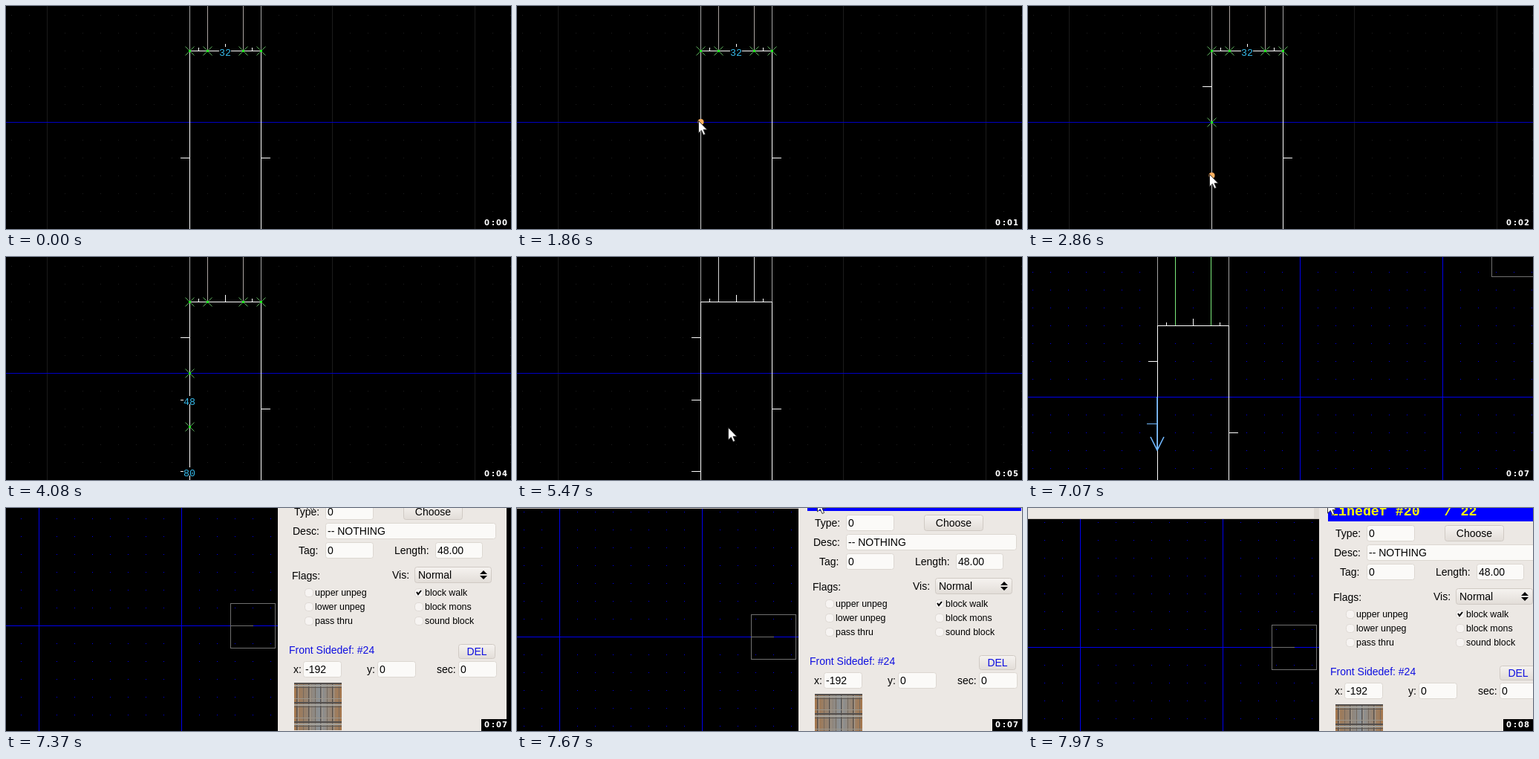
An HTML page that plays this animation: 680 by 300 pixels, repeating every 8 s.

```html
<!DOCTYPE html>
<html lang="en">
<head>
<meta charset="utf-8">
<title>Map editor</title>
<style>
  html, body { margin: 0; width: 100%; height: 100%; overflow: hidden; background: #000; }
  svg { display: block; width: 680px; height: 300px; }
  .crisp { shape-rendering: crispEdges; }
  .label { font: 13.33px "Liberation Mono", monospace; fill: #35b8e8; text-anchor: middle; }
  .ui { font: 14px "Liberation Sans", sans-serif; fill: #000; white-space: pre; }
  .small { font-size: 12.4px; }
  .title { font: bold 18.3px "Liberation Mono", monospace; fill: #ff0; }
  .clock { font: bold 10px "DejaVu Sans", sans-serif; fill: #fff; }
</style>
</head>
<body>
<svg id="stage" viewBox="0 0 680 300"></svg>
<script>
const LOOP = 8000;
const TICKS = [0, 710, 860, 1010, 1160, 1310, 1460, 1560, 1710, 1860, 2010, 2160, 2310,
  2460, 2560, 2710, 2860, 3010, 3160, 3620, 3770, 4080, 4830, 4980, 5170, 5320, 5470,
  5620, 5770, 5920, 6070, 6220, 6370, 6470, 6620, 6770, 6920, 7070, 7220, 7370, 7520,
  7670, 7820, 7970];

// [time, x, y]
const CAMERA = [[6920, 0, 0], [7070, -73, 32], [7370, -395, 194], [7970, -369, 223]];
const POINTER = [[710, 331, 66], [1710, 244, 154], [2160, 244, 154], [2860, 244, 226],
  [3160, 244, 226], [3620, 262, 232], [4830, 270, 236], [5470, 284, 229], [5770, 246, 206],
  [6370, 246, 206], [6920, 560, 30], [7070, 690, -80], [7370, 800, -210], [7970, 772, -233]];

const snap = t => TICKS.filter(k => k <= t).pop();
const during = (t, from, to) => t >= from && t < to;

function along(keys, t) {
  if (t <= keys[0][0]) return keys[0].slice(1);
  for (let i = 1; i < keys.length; i++) {
    const [t0, x0, y0] = keys[i - 1], [t1, x1, y1] = keys[i];
    if (t <= t1) {
      const p = (t - t0) / (t1 - t0);
      return [Math.round(x0 + (x1 - x0) * p), Math.round(y0 + (y1 - y0) * p)];
    }
  }
  return keys[keys.length - 1].slice(1);
}

const rect = (x, y, w, h, fill, extra = "") =>
  `<rect x="${x}" y="${y}" width="${w}" height="${h}" fill="${fill}" ${extra}/>`;
const text = (x, y, s, cls = "ui", extra = "") => `<text x="${x}" y="${y}" class="${cls}" ${extra}>${s}</text>`;
const stroke = (d, color, w = 1) => `<path d="${d}" fill="none" stroke="${color}" stroke-width="${w}"/>`;
const vLine = (x, y0, y1, color) => rect(x, y0, 1, y1 - y0, color, 'class="crisp"');
const hLine = (y, x0, x1, color) => rect(x0, y, x1 - x0, 1, color, 'class="crisp"');

function grid(t) {
  const bright = t >= 7070;
  const blue = bright ? "#0000ee" : "#0000c4";
  let out = `<defs><pattern id="dots" x="7" y="12" width="24" height="24" patternUnits="userSpaceOnUse">
    ${rect(0, 0, 1, 1, bright ? "#0000ee" : "#1e1e1e")}</pattern></defs>`;
  out += rect(-300, -300, 1200, 900, "url(#dots)");
  for (let k = -2; k < 5; k++) out += vLine(55 + 192 * k, -300, 600, bright ? blue : "#1b1b1b");
  for (let k = -2; k < 3; k++) out += hLine(156 + 192 * k, -300, 1100, blue);
  return out;
}

function vertex(x, y, r = 6, color = "#5cae5c") {
  const cx = x + .5, cy = y + .5;
  return stroke(`M${cx - r} ${cy - r}l${2 * r} ${2 * r}m0 ${-2 * r}l${-2 * r} ${2 * r}`, color) +
    rect(x - 1, y - 1, 3, 3, r > 6 ? "#ffb050" : "#20f020");
}

function lengthLabel(x, y, value) {
  return rect(x - 8, y - 7, 16, 11, "#000") + text(x, y + 5, value, "label");
}

function walls(t, pointer) {
  const vertexMode = t < 4830;
  const inner = vertexMode ? "#aaa4a0" : t < 6070 ? "#d8d8d8" : "#7cec7c";
  const corners = [60, ...(t >= 2010 ? [156] : []), ...(t >= 3010 ? [228] : []), 348];
  const splitting = during(t, 1460, 3010);
  let out = vLine(247, -300, 60, "#a4a4a4") + vLine(343, -300, 60, "#a4a4a4");
  for (const x of [271, 319]) out += vLine(x, -300, 60, inner);
  out += vLine(247, 60, 600, "#fff") + vLine(343, 60, 600, "#fff") + hLine(60, 247, 344, "#fff");
  out += vLine(259, 56, 60, "#fff") + vLine(295, 51, 60, "#fff") + vLine(331, 56, 60, "#fff");
  out += hLine(204, 344, 356, "#fff");

  for (let i = 1; i < corners.length; i++) {
    const last = i === corners.length - 1;
    if (splitting && last) out += vLine(247, corners[i - 1], 348, "#d2d2d2");
    else out += hLine((corners[i - 1] + corners[i]) / 2, 235, 247, "#fff");
  }

  if (vertexMode) {
    if (t < 3010) out += lengthLabel(295, 62, "32");
    else out += lengthLabel(247, 194, "48") + lengthLabel(247, 290, "80");
    for (const x of [247, 271, 319, 343]) out += vertex(x, 60);
    for (const y of corners.slice(1, -1)) {
      const hot = y === 228 && t < 3620;
      out += hot ? vertex(247, y, 9, "#ffb050") : vertex(247, y);
    }
    if (splitting) out += `<circle cx="247.5" cy="${pointer[1] + 2}" r="4" fill="#ffb060"/>`;
  } else if (t >= 5620) {
    out += stroke("M247 156V228M238 210L247 228L256 210", "#70b8ff", 1.6) +
      hLine(192, 233, 247, "#70b8ff");
  }
  return out;
}

const field = (x, y, w, value) =>
  rect(x + .5, y + .5, w - 1, 21, "#fbfaf8", 'rx="3" stroke="#dcd7d1"') + text(x + 3, y + 16, value);

const button = (x, y, w, h, label, color = "#000") =>
  rect(x + .5, y + .5, w - 1, h - 1, "url(#face)", 'rx="3" stroke="#d0cac4"') +
  text(x + w / 2, y + h / 2 + 5, label, "ui", `text-anchor="middle" style="fill:${color}"`);

function check(x, y, label, on) {
  return rect(x - 5.5, y - 5.5, 11, 11, "#f7f4f2", 'rx="4" stroke="#ded9d4"') +
    (on ? stroke(`M${x - 3} ${y - 1}l2 3l4 -5`, "#000", 2) : "") +
    text(x + 8, y + 4, label, "ui small");
}

function texture(x, y) {
  let out = rect(x, y, 64, 64, "url(#planks)");
  for (let i = 0; i < 4; i++) {
    const left = x + 16 * i + 3;
    out += rect(left, y, 1.5, 64, "#5a5450") + rect(left + 2, y, 1, 64, "#a89c8e") + rect(left + 9, y, 1, 64, "#75695e");
  }
  for (let top = y; top < y + 60; top += 26) {
    out += rect(x, top, 64, 2, "#54504e") + rect(x, top + 3, 64, 2, "#a2a09a") +
      rect(x, top + 6, 64, 1, "#5c5854") + rect(x, top + 21, 64, 1, "#9a948a");
  }
  return out;
}

function panel() {
  const blue = "#1010e0";
  let out = `<defs>
    <linearGradient id="face" x2="0" y2="1"><stop stop-color="#f6f3f0"/><stop offset="1" stop-color="#e2ddd8"/></linearGradient>
    <linearGradient id="planks"><stop stop-color="#a4764c"/><stop offset=".3" stop-color="#928272"/>
      <stop offset=".55" stop-color="#8a9298"/><stop offset="1" stop-color="#a4764c"/></linearGradient></defs>`;
  out += rect(-700, -40, 1092, 55, "#ece8e4") + rect(-700, 14, 1092, 1, "#c4bcb6") + rect(385, -40, 7, 54, "#e0dbd6");
  out += rect(328.5, 157.5, 60, 60, "none", 'stroke="#707070"') + hLine(187, 328, 359, "#707070");
  out += rect(392, -40, 308, 600, "#ece8e4") + rect(700, -40, 300, 600, "#000");
  out += rect(404, -14, 288, 32, "#00f") + text(407, 10, "Linedef #20   / 22", "title", 'xml:space="preserve"');
  out += text(414, 39, "Type:") + field(456, 23, 65, "0") + button(561, 23, 80, 22, "Choose");
  out += text(412, 65, "Desc:") + field(456, 49, 230, "-- NOTHING");
  out += text(420, 91, "Tag:") + field(456, 75, 65, "0");
  out += text(549, 91, "Length:") + field(604, 75, 64, "48.00");
  out += text(411, 125, "Flags:") + text(546, 124, "Vis:");
  out += button(576, 108, 104, 22, "") + text(581, 124, "Normal");
  out += `<path d="M664 118l5 -5l5 5zM664 120l5 5l5 -5z"/>`;
  ["upper unpeg", "lower unpeg", "pass thru"].forEach((s, i) => out += check(434, 143 + 19 * i, s));
  ["block walk", "block mons", "sound block"].forEach((s, i) => out += check(582, 143 + 19 * i, s, i === 0));
  out += text(407, 225, "Front Sidedef: #24", "ui", `style="fill:${blue}"`) + button(635, 212, 50, 20, "DEL", blue);
  out += text(413, 251, "x:") + field(426, 235, 52, "-192");
  out += text(512, 251, "y:") + field(526, 235, 52, "0");
  out += text(606, 251, "sec:") + field(635, 235, 52, "0");
  return out + texture(414, 264);
}

function arrow([x, y]) {
  return `<path transform="translate(${x} ${y})" d="M.5 .5V17L4.3 13.4L7 19.5L9.6 18.4L7 12.4H12Z"
    fill="#fff" stroke="#222" stroke-width=".9"/>`;
}

function clock(t) {
  const seconds = Math.floor((t + 30) / 1000);
  return rect(640, 284, 40, 16, "#000") + text("644 654 660 668", 295, "0:0" + seconds, "clock");
}

function scene(t) {
  const [cx, cy] = along(CAMERA, t), pointer = along(POINTER, t);
  const pointerShown = during(t, 710, 3770) || t >= 4830;
  return rect(0, 0, 680, 300, "#000") +
    `<g transform="translate(${cx} ${cy})">${grid(t)}${walls(t, pointer)}
      <g transform="translate(369 -223)">${panel()}</g>
      ${pointerShown ? arrow(pointer) : ""}</g>` + clock(t);
}

const stage = document.getElementById("stage");
const start = performance.now();
let shown = -1;

function draw() {
  const t = snap((performance.now() - start) % LOOP);
  if (t !== shown) stage.innerHTML = scene(shown = t);
  requestAnimationFrame(draw);
}
draw();
</script>
</body>
</html>
```
